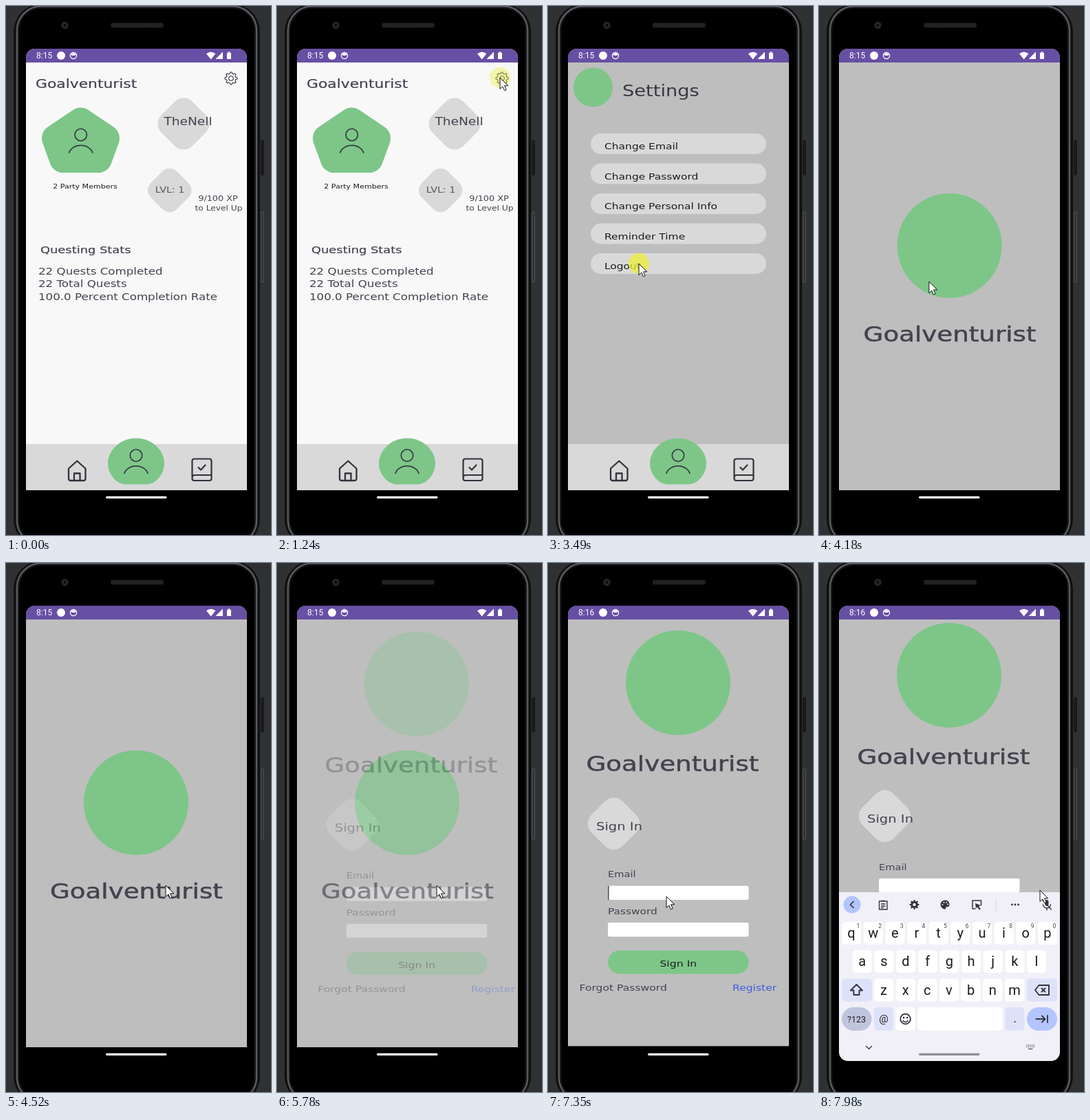
An HTML page for the animation above (8000 ms loop, 385 px wide and 768 px high).

```html
<!DOCTYPE html>
<html lang="en">
<head>
<meta charset="utf-8">
<title>Quest app</title>
<style>
html, body { margin: 0; width: 385px; height: 768px; overflow: hidden; background: #2f3133; }
svg { display: block; }
.wide { font-family: "DejaVu Sans", sans-serif; }
.ui { font-family: Roboto, sans-serif; }
.line { fill: none; stroke: #33323f; stroke-linecap: round; stroke-linejoin: round; }
</style>
</head>
<body>
<svg id="stage" width="385" height="768" viewBox="0 0 385 768"></svg>
<script>
const LOOP = 8000, GREEN = '#7dc688', PALE = '#d9d9d9', GREY = '#bebebe', INK = '#45424f', DARK = '#1c1b1f';
const APP = 'Goalventurist', USER = 'TheNell';

// Markup helpers
const rect = (x, y, w, h, fill, r = 0, more = '') =>
  `<rect x="${x}" y="${y}" width="${w}" height="${h}" rx="${r}" fill="${fill}" ${more}/>`;
const disc = (x, y, r, fill, more = '') => `<circle cx="${x}" cy="${y}" r="${r}" fill="${fill}" ${more}/>`;
const line = (d, w = 1.6, more = '') => `<path class="line" d="${d}" stroke-width="${w}" ${more}/>`;
const shape = (d, fill) => `<path d="${d}" fill="${fill}"/>`;
const wide = (x, y, size, text, fill = INK, more = '') =>
  `<text class="wide" transform="translate(${x} ${y}) scale(1.2 1)" font-size="${size}" fill="${fill}" ${more}>${text}</text>`;
const ui = (x, y, size, text, fill = DARK, anchor = 'middle', id = '') =>
  `<text class="ui" id="${id}" x="${x}" y="${y}" font-size="${size}" fill="${fill}" text-anchor="${anchor}">${text}</text>`;
const group = (id, body) => `<g id="${id}">${body}</g>`;
const middle = 'text-anchor="middle"';

const diamond = (x, y, half) => {
  const r = half * .48, s = (half + r * .414) * Math.SQRT2;
  return rect(-s / 2, -s / 2, s, s, PALE, r, `transform="translate(${x} ${y}) rotate(45)"`);
};
const person = (x, y) =>
  line(`M${x - 17} ${y + 26}a17.5 14 0 0 1 34 0`) + disc(x, y, 8.7, 'none', 'class="line" stroke-width="1.6"');
const gear = (x, y, r, inner) => {
  let d = '';
  for (let i = 0; i < 32; i++) {
    const a = (i - .5) * Math.PI / 16, q = i % 4 < 2 ? r : inner;
    d += `${i ? 'L' : 'M'}${(x + q * Math.sin(a)).toFixed(2)} ${(y - q * Math.cos(a)).toFixed(2)}`;
  }
  return d + 'Z';
};

const phone =
  rect(0, 0, 385, 768, '#2f3133') +
  rect(370, 195, 5, 51, '#1d1a1c', 1) +
  rect(371, 299, 3, 102, '#242426', 1, 'stroke="#6d6e72" stroke-width=".8"') +
  rect(11, -3, 358, 788, '#101112', 40) +
  rect(16, .5, 348, 781, '#000', 35, 'stroke="#595b5f" stroke-width="2.6"') +
  rect(18.5, 3, 343, 776, '#000', 33, 'stroke="#202124"') +
  disc(85.5, 28, 5.5, '#1c1c1d') + disc(85.5, 28, 3, '#0b0b0c', 'stroke="#3c3c3e"') +
  rect(152, 24.5, 77, 7, '#1b1b1c', 3) +
  [26, 28, 30].map((y, i) => line(`M${154 + i % 2} ${y}H227`, 1, 'style="stroke:#434345" stroke-dasharray="0 2.2"')).join('') +
  rect(145, 711.7, 88.5, 3.2, '#fff', 1.6);

const statusBar =
  rect(29, 62, 321, 20, '#674fa4') +
  ui(44, 76.3, 12, '8:15', '#fff', 'start', 'clock') +
  disc(80, 72, 6, '#fff') +
  disc(98, 72, 4.6, 'none', 'stroke="#fff" stroke-width="1.3"') +
  shape('M94 70.5a4.6 4.6 0 0 1 8 0q-4 3-8 0Z', '#fff') +
  shape('M291 69.3q6.7-5 13.4 0L297.7 77.5Z M304.5 77H315V66.5Z M321 68h1.5v-1.5h3V68H327v9h-6Z', '#fff');

const nav =
  rect(29, 636, 321, 67, PALE) +
  shape('M189 627.5C213 627.5 230 646 230 664C230 680 217 694.5 204 694.5H174C161 694.5 148 680 148 664C148 646 165 627.5 189 627.5Z', GREEN) +
  person(189, 652.5) +
  line('M91 671.5L103.3 660.5L115.5 671.5V686q0 3-3 3H94q-3 0-3-3ZM99 689V678.5h8.5V689', 2.3) +
  line('M273.5 657.5h22q3 0 3 3v25.5q0 3-3 3h-22q-3 0-3-3v-25.5q0-3 3-3ZM270.5 685.5q0-4.5 4-4.5H298M279.5 670l3.5 3.5 6.5-7', 2.2);

const profile =
  rect(29, 62, 321, 641, '#f8f8f8') +
  wide(43, 119, 18.2, APP, INK, 'stroke="#45424f" stroke-width=".2"') +
  line(gear(327, 105, 9, 6.8), 1.1) + disc(327, 105, 3.3, 'none', 'class="line" stroke-width="1.1"') +
  `<path d="M108.500 167.500L145 192L134 222H83L72 192Z" fill="${GREEN}" stroke="${GREEN}" stroke-width="40" stroke-linejoin="round"/>` +
  person(108.7, 187) +
  wide(115, 265, 9.2, '2 Party Members', DARK, middle) +
  diamond(258, 171, 37.5) + wide(264.5, 173, 15.5, USER, INK, middle) +
  diamond(237.7, 267.5, 31.7) + wide(238, 271, 11.9, 'LVL: 1', '#58565f', middle) +
  wide(308, 283, 10.7, '9/100 XP', INK, middle) +
  wide(309, 297, 10.2, 'to Level Up', INK, middle) +
  wide(50, 359, 14.9, 'Questing Stats', INK, 'stroke="#45424f" stroke-width=".2"') +
  ['22 Quests Completed', '22 Total Quests', '100.0 Percent Completion Rate']
    .map((s, i) => wide(47, 389.5 + i * 18.8, 13.9, s)).join('');

const settings =
  rect(29, 62, 321, 641, GREY) +
  disc(65.5, 118, 28.5, GREEN) +
  wide(108, 131, 22.7, 'Settings', '#3a3842') +
  ['Change Email', 'Change Password', 'Change Personal Info', 'Reminder Time', 'Logout']
    .map((s, i) => rect(62, 185 + i * 43.5, 255, 30, PALE, 15) + wide(82, 208 + i * 43.5, 12.9, s, DARK)).join('');

const bigName = (x, y) => wide(x, y, 31, APP, INK, 'stroke="#45424f" stroke-width=".5"');
const plain = rect(0, 62, 385, 641, GREY);
const splash = plain + disc(189, 348, 76, GREEN) + bigName(64, 487);

const signIn = plain +
  disc(189, 175.5, 76, GREEN) + bigName(55.5, 304) +
  diamond(95.5, 380, 37.7) + wide(70, 389.5, 16.3, 'Sign In') +
  wide(87, 458, 12.2, 'Email') + rect(87, 470.4, 204.5, 20.3, '#fff', 2.5) +
  rect(87, 470.4, 1.6, 20.3, '#55555c', 0, 'id="caret"') +
  wide(87, 511.5, 12.8, 'Password') + rect(87, 523.7, 204.5, 20.3, '#fff', 2.5) +
  rect(87, 564, 204.5, 34, GREEN, 17) + wide(189.3, 588, 13.1, 'Sign In', DARK, middle) +
  wide(45.5, 623, 13, 'Forgot Password') + wide(268, 623, 13, 'Register', '#3f5fe0');

const KEY = 31.65, TINT = '#dee2f9', BLUE = '#b2c5ff';
const keyRow = (text, x, y) => [...text].map((c, i) =>
  rect(x + i * KEY - 14, y, 28.3, 33, '#fff', 5) + ui(x + i * KEY, y + 23, 20, c)).join('');
const keyboard =
  rect(29, 478, 321, 246, '#f1f0f8') +
  disc(48, 496, 12.5, BLUE) + line('M50 491.5l-4.5 4.5 4.5 4.5', 1.7) +
  line('M87.5 491h11.5v12h-11.5ZM91 490.5h4.5M90.5 495h5.5M90.5 498h5.5M90.5 500.5h3', 1.4) +
  shape(gear(138.5, 496, 7, 5), '#33323f') + disc(138.5, 496, 2.2, '#f1f0f8') +
  shape('M183 489.5a6.5 6.5 0 1 0 0 13c2 0 1-2 1.5-3s5 1 5-3.5-3-6.5-6.5-6.5Z', '#33323f') +
  [[179.5, 496], [181.5, 492.8], [185, 492.8], [187, 495.5]].map(p => disc(...p, 1, '#f1f0f8')).join('') +
  line('M227 502h-4v-12h12.5v7', 1.5) + shape('M227 494l8 3-3 1.5 3 4-2 1-3-4-2 2Z', '#33323f') +
  rect(257, 487, 1, 18, '#d5d5dd') +
  [280.5, 285, 289.5].map(x => disc(x, 496, 1.4, '#33323f')).join('') +
  rect(328.5, 489, 5, 9, '#33323f', 2.5) + line('M325.5 496a5.5 5 0 0 0 11 0M331 501v3M324.5 489l13 14', 1.4) +
  keyRow('qwertyuiop', 47, 521) +
  [...'1234567890'].map((c, i) => ui(57 + i * KEY, 530, 8.5, c, '#45464f')).join('') +
  keyRow('asdfghjkl', 62.7, 562) + keyRow('zxcvbnm', 94, 603.5) +
  rect(33, 603.5, 44, 33, TINT, 5) + line('M54.5 612l8.5 8.5h-4.5v6.5h-8v-6.5h-4.5Z', 1.9) +
  rect(302, 603.5, 44, 33, TINT, 5) + line('M314 620l5.5-7h14.5v14h-14.5ZM323.5 617.5l5 5M328.5 617.5l-5 5', 1.9) +
  rect(33, 645, 43.5, 34, '#bfc5dd', 17) + ui(54.5, 666.5, 12.5, '?123') +
  rect(80, 645, 28, 34, TINT, 5) + ui(94, 667, 15, '@') +
  rect(111.5, 645, 28.3, 34, '#fff', 5) +
  disc(125.6, 662, 7.3, 'none', 'class="line" stroke-width="1.8"') +
  disc(123, 660, 1.2, DARK) + disc(128.2, 660, 1.2, DARK) + line('M122 664.5q3.6 4 7.2 0', 1.6) +
  rect(143, 645, 124, 34, '#fff', 5) +
  rect(270.5, 645, 28, 34, TINT, 5) + ui(284.5, 667, 18, '.') +
  rect(302, 645, 44, 34, BLUE, 17) + line('M315.5 662h13M324 657.5l4.5 4.5-4.5 4.5M332 657v10', 1.8) +
  line('M68.5 701.5l4 4 4-4', 1.3) +
  [700, 702.5].map(y => line(`M302 ${y}H313`, 1.4, 'stroke-dasharray="0 2.6"')).join('') +
  line('M304.5 705.5H310', 1.2);

const pointer =
  disc(0, 0, 15, '#eeee37', 'id="press"') +
  '<path d="M0 0V16.5L3.9 12.9L6.5 18.8L9.2 17.6L6.6 11.8H11.8Z" fill="#fff" stroke="#111" stroke-width="1"/>';

const stage = document.getElementById('stage');
stage.innerHTML =
  `<clipPath id="screen">${rect(29, 62, 321, 641, '#000', 13)}${rect(29, 90, 321, 613, '#000')}</clipPath>
   <clipPath id="display">${rect(29, 62, 321, 661, '#000', 13)}</clipPath>` + phone +
  `<g clip-path="url(#screen)">` +
  group('profile', profile) + group('settings', settings) + group('nav', nav) +
  group('splash', splash) + group('signIn', signIn) + statusBar + '</g>' +
  `<g clip-path="url(#display)">${group('keyboard', keyboard)}</g>` +
  rect(145, 711.7, 88.5, 3.2, '#8f8f95', 1.6, 'id="pill"') + group('pointer', pointer);

const el = id => document.getElementById(id);
const show = (id, on) => el(id).style.display = on ? '' : 'none';
const move = (id, x, y) => el(id).setAttribute('transform', `translate(${x.toFixed(2)} ${y.toFixed(2)})`);
const progress = (t, a, b) => Math.min(1, Math.max(0, (t - a) / (b - a)));
const easeOut = p => 1 - (1 - p) ** 3;

// Pointer path: time, x, y
const path = [
  [130, 360, 752], [340, 327, 286], [560, 327, 286], [1100, 324, 104], [1400, 324, 104],
  [1580, 310, 132], [1850, 226, 327], [2190, 226, 327], [2740, 132, 374], [4050, 132, 374],
  [4520, 232, 468], [6540, 232, 468], [6810, 172, 484], [7420, 172, 484], [7980, 321, 475]
];
const presses = [1170, 3490, 6810];
const SPLASH_IN = 3910, SIGN_IN = 5780, FADE = 140, FOCUS = 7350;

function pointerAt(t) {
  const i = path.findIndex(k => k[0] > t);
  if (i < 0) return path[path.length - 1].slice(1);
  if (!i) return path[0].slice(1);
  const [a, x, y] = path[i - 1], [b, u, v] = path[i];
  const p = progress(t, a, b);
  return [x + (u - x) * p, y + (v - y) * p];
}

// A new page slides in from the right while it fades in
function enter(id, t, start, end, y = 0) {
  show(id, t >= start && t < end);
  el(id).setAttribute('opacity', progress(t, start - 70, start + FADE));
  move(id, 22 * (1 - easeOut(progress(t, start - 70, start + 420))), y);
}

function draw(t) {
  show('profile', t < 1440);
  show('settings', t >= 1440 && t < SPLASH_IN + FADE);
  show('nav', t < SPLASH_IN + FADE);
  enter('splash', t, SPLASH_IN, SIGN_IN + FADE);

  const rise = t < FOCUS ? 0 : easeOut(progress(t, FOCUS - 18, 7760));
  enter('signIn', t, SIGN_IN, LOOP, -12.5 * rise);
  show('caret', t >= FOCUS && (t - FOCUS) % 1000 < 500);
  show('keyboard', t >= 7400);
  show('pill', t >= 7400);
  move('keyboard', 0, 245 * (1 - easeOut(progress(t, 7380, 7780))));
  el('clock').textContent = t < 6740 ? '8:15' : '8:16';

  show('pointer', t >= 130);
  move('pointer', ...pointerAt(t));
  const since = Math.min(...presses.map(p => t >= p ? t - p : LOOP));
  el('press').setAttribute('opacity', since < 70 ? .75 : since < 140 ? .4 : 0);
}

function tick() {
  draw(performance.now() % LOOP);
  requestAnimationFrame(tick);
}
tick();
</script>
</body>
</html>
```
